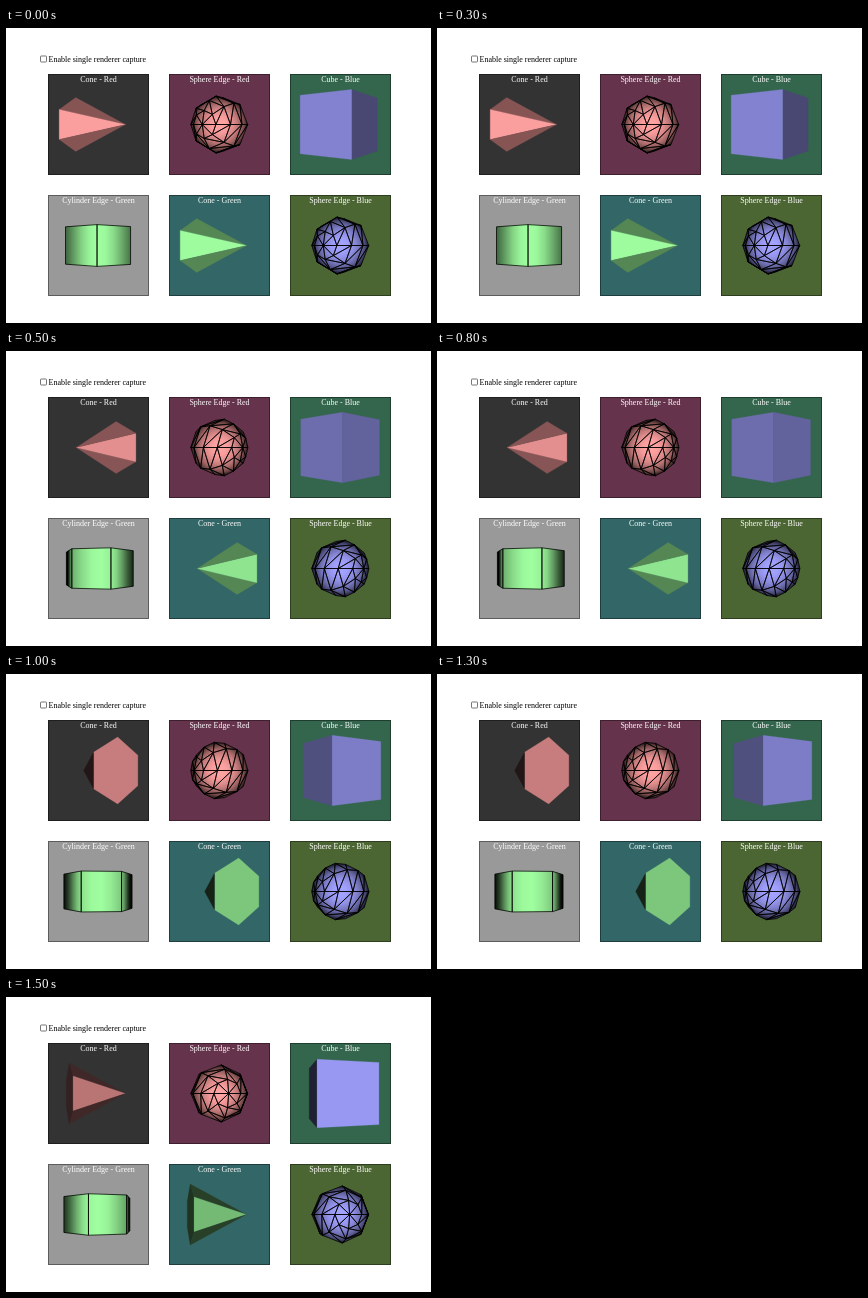
Animation of 425 by 295 pixels, one loop 2000 ms. Source, as an HTML page with a canvas:

```html
<!DOCTYPE html>
<html lang="en">
<head>
<meta charset="utf-8">
<title>Single renderer capture</title>
<style>
  html, body { margin: 0; width: 100%; height: 100%; overflow: hidden; background: #fff; }
  canvas, svg { position: absolute; left: 0; top: 0; width: 425px; height: 295px; }
  text { font: 8px "Liberation Serif", "Times New Roman", serif; }
  .title { fill: #fff; text-anchor: middle; }
</style>
</head>
<body>
<canvas id="scene"></canvas>
<svg id="labels" viewBox="0 0 425 295">
  <rect x="34.5" y="28" width="6" height="6" rx=".7" fill="#fff" stroke="#555" stroke-width=".8"/>
  <text x="42.5" y="33.6" fill="#000">Enable single renderer capture</text>
</svg>
<script>
const W = 425, H = 295, SIZE = 101, PITCH = 121, LEFT = 42, TOP = 46;
const STEP = 500;
const ANGLES = [32, 132.5, 235, 344];           // turn of the models, degrees
const HALF_VIEW = Math.PI / 12;                 // half of a 30 degree lens
const FOCAL = 50 / Math.tan(HALF_VIEW);

const RED = [255, 160, 160], GREEN = [160, 255, 160], BLUE = [160, 160, 255];
const range = n => [...Array(n).keys()];
const rad = deg => deg * Math.PI / 180;
const sub = (a, b) => a.map((v, i) => v - b[i]);
const dot = (a, b) => a[0] * b[0] + a[1] * b[1] + a[2] * b[2];
const cross = (a, b) => [
  a[1] * b[2] - a[2] * b[1], a[2] * b[0] - a[0] * b[2], a[0] * b[1] - a[1] * b[0]
];

function cone() {
  const base = range(6).map(i => [-.5, .5 * Math.cos(rad(60 * i)), .5 * Math.sin(rad(60 * i))]);
  return {
    points: [...base, [.5, 0, 0]],
    faces: [range(6), ...range(6).map(i => [i, (i + 1) % 6, 6])]
  };
}

function cube() {
  const points = range(8).map(i => [(i & 1) - .5, (i >> 1 & 1) - .5, (i >> 2) - .5]);
  const faces = [[0, 2, 6, 4], [1, 3, 7, 5], [0, 1, 5, 4], [2, 3, 7, 6], [0, 1, 3, 2], [4, 5, 7, 6]];
  return { points, faces };
}

function cylinder() {
  const ring = y => range(6).map(i => [Math.cos(rad(60 * i)), y, -Math.sin(rad(60 * i))]);
  return {
    points: [...ring(.5), ...ring(-.5)],
    faces: range(6).map(i => [i, (i + 1) % 6, (i + 1) % 6 + 6, i + 6]),
    shading: "barrel"
  };
}

function sphere() {
  const points = [[0, 0, .5], [0, 0, -.5]], faces = [];
  const at = (i, j) => 2 + (i % 8) * 6 + j;
  for (let i = 0; i < 8; i++) {
    const t = rad(45 * i);
    for (let j = 0; j < 6; j++) {
      const p = Math.PI * (j + 1) / 7, r = .5 * Math.sin(p);
      points.push([r * Math.cos(t), r * Math.sin(t), .5 * Math.cos(p)]);
      if (j < 5) {
        faces.push([at(i, j), at(i, j + 1), at(i + 1, j + 1)],
                   [at(i, j), at(i + 1, j + 1), at(i + 1, j)]);
      }
    }
    faces.push([0, at(i, 0), at(i + 1, 0)], [1, at(i, 5), at(i + 1, 5)]);
  }
  return { points, faces, shading: "ball" };
}

const CELLS = [
  { title: "Cone - Red", back: "#333333", color: RED, mesh: cone() },
  { title: "Sphere Edge - Red", back: "#66334c", color: RED, mesh: sphere(), edges: true },
  { title: "Cube - Blue", back: "#33664c", color: BLUE, mesh: cube() },
  { title: "Cylinder Edge - Green", back: "#999999", color: GREEN, mesh: cylinder(), edges: true },
  { title: "Cone - Green", back: "#336666", color: GREEN, mesh: cone() },
  { title: "Sphere Edge - Blue", back: "#4c6633", color: BLUE, mesh: sphere(), edges: true }
];

CELLS.forEach((cell, i) => {
  cell.x = LEFT + PITCH * (i % 3);
  cell.y = TOP + PITCH * Math.floor(i / 3);
  const spans = [0, 1, 2].map(k => 2 * Math.max(...cell.mesh.points.map(p => Math.abs(p[k]))));
  cell.distance = Math.hypot(...spans) / 2 / Math.sin(HALF_VIEW);
  const label = document.createElementNS("http://www.w3.org/2000/svg", "text");
  label.setAttribute("class", "title");
  label.setAttribute("x", cell.x + SIZE / 2);
  label.setAttribute("y", cell.y + 8);
  label.textContent = cell.title;
  document.getElementById("labels").append(label);
});

const canvas = document.getElementById("scene");
const ctx = canvas.getContext("2d");
const ratio = window.devicePixelRatio || 1;
canvas.width = W * ratio;
canvas.height = H * ratio;
ctx.scale(ratio, ratio);
ctx.lineJoin = "round";

// Headlight: brightness follows how far a surface faces the viewer.
const lit = (color, facing) => {
  const k = Math.max(0, facing) ** 1.25;
  return `rgb(${color.map(v => Math.round(v * k))})`;
};

function ballFill(color) {
  const fill = ctx.createRadialGradient(0, 0, 0, 0, 0, 28.3);
  for (let r = 0; r <= 1; r += .125) fill.addColorStop(r, lit(color, Math.sqrt(1.04 - r * r)));
  return fill;
}

// Blend the corner normals across one side of the barrel.
function barrelFill(color, a, b, xa, xb) {
  const fill = ctx.createLinearGradient(xa, 0, xb, 0);
  for (let t = 0; t <= 1; t += .25) {
    const x = a[0] + (b[0] - a[0]) * t, z = a[2] + (b[2] - a[2]) * t;
    fill.addColorStop(t, lit(color, z / Math.hypot(x, z)));
  }
  return fill;
}

function drawModel({ mesh, color, edges, distance }, angle) {
  const c = Math.cos(rad(angle)), s = Math.sin(rad(angle));
  const turned = mesh.points.map(([x, y, z]) => [x * c - z * s, y, x * s + z * c]);
  const flat = turned.map(([x, y, z]) => [x, -y].map(v => v * FOCAL / (distance - z)));
  const ball = mesh.shading === "ball" && ballFill(color);
  const visible = [];

  for (const face of mesh.faces) {
    const [a, b, d] = face.map(i => turned[i]);
    let n = cross(sub(b, a), sub(d, a));
    if (dot(n, a) < 0) n = n.map(v => -v);
    if (dot(n, sub([0, 0, distance], a)) <= 0) continue;

    const path = new Path2D();
    face.forEach(i => path.lineTo(...flat[i]));
    path.closePath();
    visible.push(path);

    const fill = ball || (mesh.shading === "barrel"
      ? barrelFill(color, a, b, flat[face[0]][0], flat[face[1]][0])
      : lit(color, n[2] / Math.hypot(...n)));
    ctx.fillStyle = ctx.strokeStyle = fill;
    ctx.lineWidth = .25;
    ctx.fill(path);
    ctx.stroke(path);
  }

  if (edges) {
    ctx.strokeStyle = "#000";
    ctx.lineWidth = .75;
    visible.forEach(path => ctx.stroke(path));
  }
}

function draw(pose) {
  ctx.clearRect(0, 0, W, H);
  for (const cell of CELLS) {
    ctx.fillStyle = cell.back;
    ctx.fillRect(cell.x, cell.y, SIZE, SIZE);
    ctx.strokeStyle = "rgba(0,0,0,.4)";
    ctx.lineWidth = 1;
    ctx.strokeRect(cell.x + .5, cell.y + .5, SIZE - 1, SIZE - 1);
    ctx.save();
    ctx.translate(cell.x + SIZE / 2, cell.y + SIZE / 2);
    drawModel(cell, ANGLES[pose]);
    ctx.restore();
  }
}

const start = performance.now();
let shown = -1;
function tick() {
  const pose = Math.floor((performance.now() - start) / STEP) % ANGLES.length;
  if (pose !== shown) draw(shown = pose);
  requestAnimationFrame(tick);
}
tick();
</script>
</body>
</html>
```
